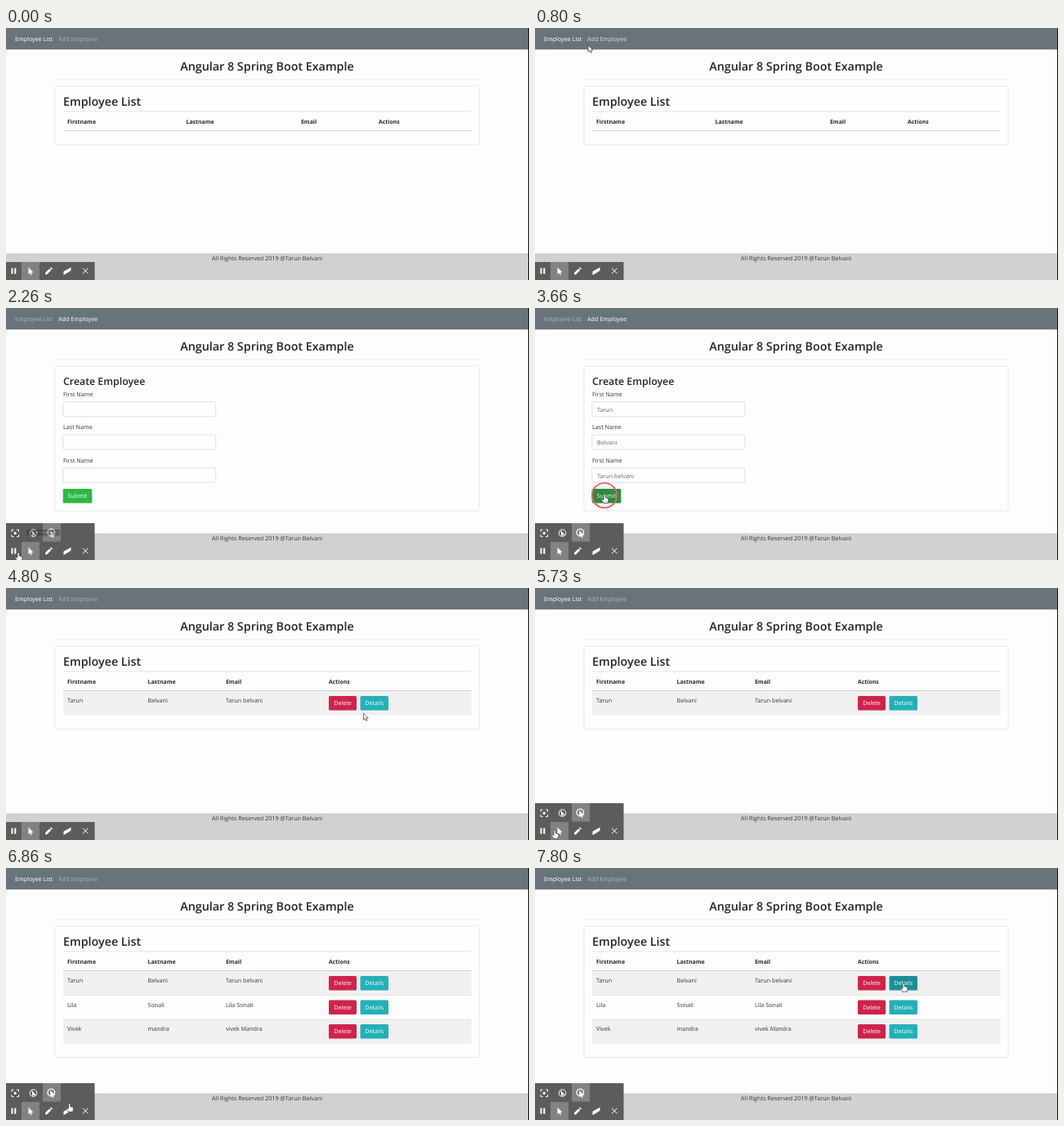
An HTML page that plays this animation: 640x308 px, repeating every 8000 ms.

```html
<!DOCTYPE html>
<html lang="en">
<head>
<meta charset="utf-8">
<title>Employee List</title>
<style>
html, body { margin: 0; width: 100%; height: 100%; overflow: hidden; background: #fdfdfd; }
svg { display: block; width: 100%; height: 100%; }
text { font: 7.2px "Open Sans", "Noto Sans", sans-serif; fill: #33393d; text-rendering: geometricPrecision; }
.h2 { font-size: 14.3px; font-weight: 600; fill: #212529; }
.h3 { font-size: 12.35px; font-weight: 600; fill: #212529; }
.th { font-size: 6.9px; font-weight: 700; fill: #212529; }
.mid { text-anchor: middle; }
.value { fill: #62686c; }
.light { fill: #fff; }
.card, .input { fill: #fdfdfd; stroke: #dfdfdf; stroke-width: .7; }
.input { stroke: #d3d7da; }
.submit { fill: #2eb845; } .submit.hot { fill: #23913a; }
.delete { fill: #d0234a; } .delete.hot { fill: #ae1c3c; }
.details { fill: #22b0b8; } .details.hot { fill: #1b8f98; }
.icon { fill: none; stroke: #fff; }
.tip { font-size: 3.9px; font-weight: 600; fill: #fff; }
</style>
</head>
<body>
<svg viewBox="0 0 640 308" preserveAspectRatio="none">
  <rect width="640" height="308" fill="#fdfdfd"/>
  <rect width="640" height="26.3" fill="#69747a"/>
  <text id="navList" class="light" x="11" y="16">Employee List</text>
  <text id="navAdd" class="light" x="64" y="16">Add Employee</text>
  <text class="h2 mid" x="319.5" y="52">Angular 8 Spring Boot Example</text>
  <path d="M60 63H579" stroke="#e6e6e6" stroke-width=".8"/>
  <g id="pages"></g>
  <rect y="275.3" width="640" height="33" fill="#d1d1d1"/>
  <text class="mid" x="319.5" y="283.6">All Rights Reserved 2019 @Tarun Belvani</text>
  <rect x="639" width="1" height="308" fill="#111"/>

  <g id="drawer">
    <rect y="263" width="108.5" height="24" fill="#5c5c5c"/>
    <rect x="45" y="263" width="22" height="22.5" fill="#828282"/>
    <path class="icon" d="M7 273.5V271H9.5M13 271H15.5V273.5M15.5 277V279.5H13M9.5 279.5H7V277"/>
    <circle cx="11.2" cy="275.2" r="1.6" fill="#fff"/>
    <circle class="icon" cx="33.5" cy="275" r="4.3"/>
    <path d="M32 272V279L33.8 277.5H36.5Z" fill="#fff"/>
    <path class="icon" d="M30.5 272L36.5 278"/>
    <circle class="icon" cx="55.3" cy="274.5" r="4.3" stroke-width="1.3"/>
    <path d="M54.3 272V280L56.3 278.3 57.5 281 58.8 280.4 57.7 277.7H60Z" fill="#fff"/>
  </g>
  <rect y="286" width="108.5" height="22" fill="#5c5c5c"/>
  <rect x="19" y="286" width="22" height="22" fill="#828282"/>
  <path d="M6.5 293.5h2v7h-2ZM10.3 293.5h2v7h-2Z" fill="#fff"/>
  <path d="M27.5 292.5V301L29.4 299.3 30.8 302 32 301.4 30.8 298.7H33.5Z" fill="#fff"/>
  <path d="M48 301.3V299.2L53.3 293.9 55.4 296 50.1 301.3ZM54 293.2L55 292.2 57.1 294.3 56.1 295.3Z" fill="#fff"/>
  <path d="M70.5 297.5L79.5 292.5V296.5L74 300 70.5 302Z" fill="#fff"/>
  <path class="icon" d="M94 293.5L100.5 300.2M100.5 293.5L94 300.2"/>
  <g id="tooltip">
    <rect x="-35" y="-6.5" width="70" height="13" rx="1.5" fill="#161616"/>
    <text class="tip mid" y="1.4">Pause Recording (Alt+Shift+P)</text>
  </g>

  <circle id="ring" r="15.2" fill="#d9434b" fill-opacity=".06" stroke="#e0666b" stroke-width="1.8"/>
  <g id="cursor" fill="#fff" stroke="#333" stroke-width=".7" stroke-linejoin="round">
    <path id="arrow" d="M0 0V8.2L1.9 6.5 3.2 9.3 4.5 8.7 3.2 6H5.8Z"/>
    <path id="hand" d="M0 .8A1.1 1.1 0 0 1 2.2 .8V3.8L5 4.5Q6.200 4.8 6 6.400L5.300 10.300H0L-2.700 6.500Q-2.200 4.800 0 6.400Z"/>
  </g>
</svg>
<script>
const $ = id => document.getElementById(id);
const text = (x, y, s, cls = '') => `<text x="${x}" y="${y}" class="${cls}">${s}</text>`;
const rect = (x, y, w, h, cls) => `<rect x="${x}" y="${y}" width="${w}" height="${h}" rx="1.6" class="${cls}"/>`;
const line = (y, color) => `<path d="M70 ${y}H569.5" stroke="${color}"/>`;
const button = (x, y, w, s) =>
  rect(x, y, w, 17.5, 'btn ' + s.toLowerCase()) + text(x + w / 2, y + 11.4, s, 'light mid');

const people = [
  ['Tarun', 'Belvani', 'Tarun belvani'],
  ['Lila', 'Sonali', 'Lila Sonali'],
  ['Vivek', 'mandra', 'vivek Mandra']
];

function listPage(count) {
  const cols = count ? [75, 173.5, 269, 395] : [75, 220.5, 361, 456];
  const rows = people.slice(0, count).map((person, i) => {
    const y = 126 + i * 29.5;
    return `<rect x="70" y="${y}" width="499.5" height="29.5" fill="${i % 2 ? '#fdfdfd' : '#f0f0f0'}"/>` +
      (i ? line(y, '#e2e4e6') : '') +
      person.map((s, k) => text(cols[k], y + 14, s)).join('') +
      button(395, y + 6, 34, 'Delete') + button(433.5, y + 6, 34.5, 'Details');
  });
  return rect(60, 71, 519, count ? 72 + count * 29.5 : 72, 'card') +
    text(70, 95.3, 'Employee List', 'h2') + line(102, '#e2e4e6') +
    ['Firstname', 'Lastname', 'Email', 'Actions'].map((s, k) => text(cols[k], 116.7, s, 'th')).join('') +
    rows.join('') + line(125.5, '#d0d3d6');
}

function formPage(values) {
  const fields = ['First Name', 'Last Name', 'First Name'].map((label, i) => {
    const y = 108 + i * 40.3;
    return text(70, y, label) + rect(69.7, y + 6.7, 187, 18, 'input') + text(76, y + 18.9, values[i] || '', 'value');
  });
  return rect(60, 71, 519, 177, 'card') + text(70, 93.7, 'Create Employee', 'h3') +
    fields.join('') + button(69.7, 221, 35.6, 'Submit');
}

$('pages').innerHTML = [listPage(0), formPage([]), formPage(people[0]), listPage(1), listPage(3)]
  .map(s => `<g>${s}</g>`).join('');
const pages = [...$('pages').children];
const pageStarts = [0, 1200, 2530, 3930, 6600];

// time, x, y of the pointer tip
const path = [
  [130, 35, 262], [780, 65, 21], [930, 66, 21], [1060, 80, 14], [1600, 80, 16],
  [2200, 14, 299], [2600, 14, 299], [3230, 86, 236], [3400, 84, 228], [3950, 84, 228],
  [4530, 410, 184], [4740, 437.5, 153], [5000, 437.5, 153], [5800, 14, 299],
  [6660, 14, 299], [7530, 476, 216], [7780, 450, 141], [8000, 450, 141]
];
const clicks = [[1060, 1330], [3660, 3900]];

const clamp = v => Math.min(1, Math.max(0, v));
const ramp = (t, a, b) => clamp((t - a) / (b - a));
const within = (t, a, b) => t >= a && t < b;
const show = (el, on) => { el.style.display = on ? '' : 'none'; };

function pointerAt(t) {
  const i = Math.max(1, path.findIndex(p => p[0] > t));
  const [a, b] = [path[i - 1], path[i]];
  const k = ramp(t, a[0], b[0]), e = k * k * (3 - 2 * k);
  return [a[1] + (b[1] - a[1]) * e, a[2] + (b[2] - a[2]) * e];
}

function draw(t) {
  const [x, y] = pointerAt(t);
  const page = pageStarts.filter(s => t >= s).length - 1;
  pages.forEach((el, i) => show(el, i === page));

  const drawerOpen = within(t, 2060, 4000) || t >= 5660;
  const overAdd = within(x, 62, 116) && y < 22;
  let hand = (overAdd && y < 20) || (x < 108 && y > (drawerOpen ? 263 : 286));
  for (const b of pages[page].querySelectorAll('.btn')) {
    const [bx, by, w, h] = ['x', 'y', 'width', 'height'].map(k => +b.getAttribute(k));
    const hot = within(x, bx, bx + w) && within(y, by, by + h);
    b.classList.toggle('hot', hot);
    hand = hand || hot;
  }

  const onForm = page === 1 || page === 2;
  $('navList').style.opacity = onForm ? .45 : 1;
  $('navAdd').style.opacity = onForm ? 1 : overAdd ? .75 : .45;

  show($('drawer'), drawerOpen);
  const tip = ramp(t, 2200, 2400) * (1 - ramp(t, 2600, 2700)) + ramp(t, 5850, 6050) * (1 - ramp(t, 6660, 6760));
  $('tooltip').style.opacity = tip;
  $('tooltip').setAttribute('transform', `translate(45.5 274.5) scale(${.4 + .6 * tip})`);

  const click = clicks.find(([a, b]) => within(t, a, b));
  show($('ring'), click);
  if (click) {
    $('ring').setAttribute('transform', `translate(${x + 1} ${y + 1})`);
    $('ring').style.opacity = 1 - .7 * ramp(t, click[0] + 130, click[1]);
  }

  show($('cursor'), t >= path[0][0]);
  show($('arrow'), !hand);
  show($('hand'), hand);
  $('cursor').setAttribute('transform', `translate(${x} ${y})`);
}

const start = performance.now();
function tick() {
  draw((performance.now() - start) % 8000);
  requestAnimationFrame(tick);
}
tick();
</script>
</body>
</html>
```
